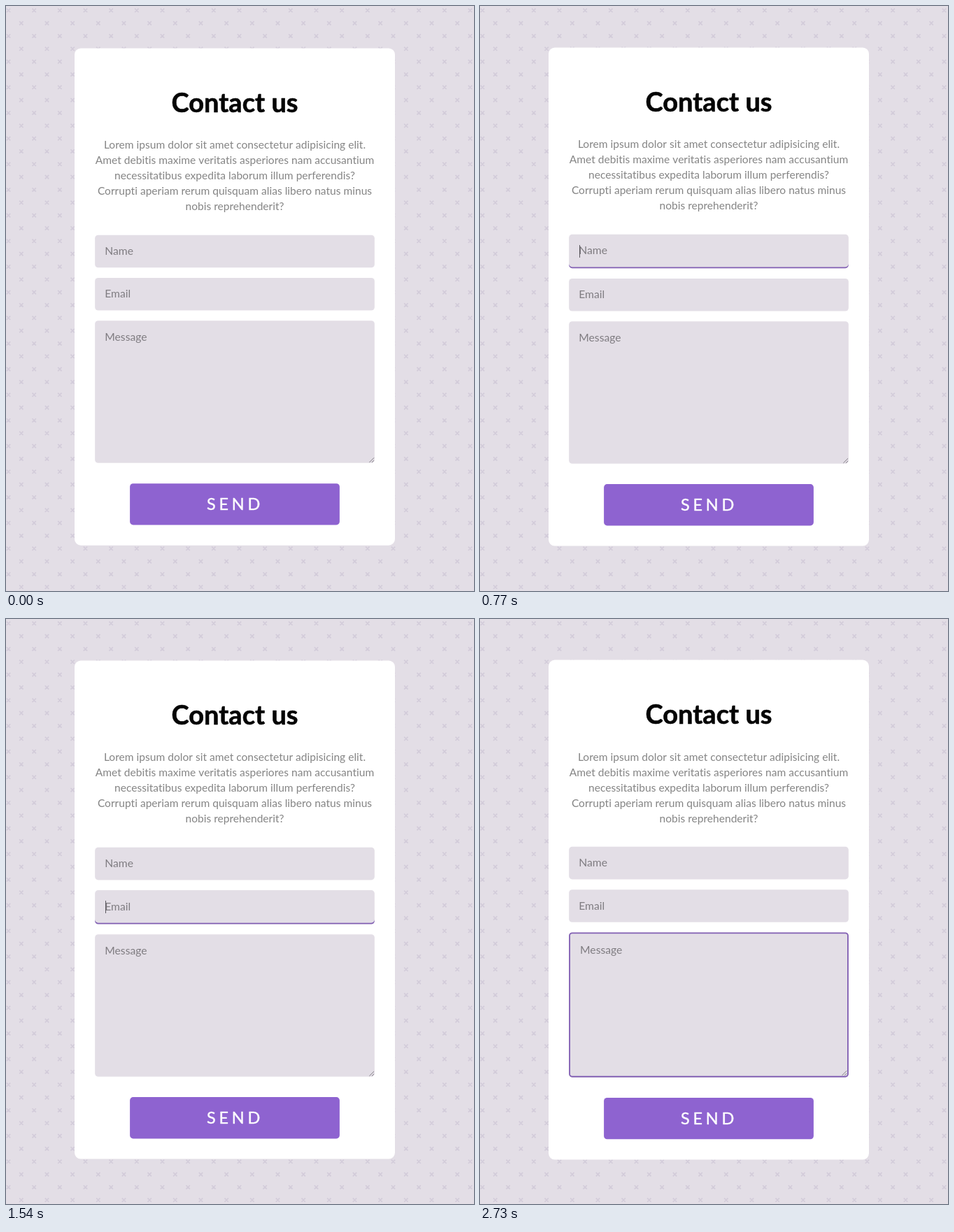
Recreate the animation shown at these times as an HTML page with a canvas. Size 669 by 837 pixels, loop 2800 ms.

```html
<!DOCTYPE html>
<html lang="en">
<head>
<meta charset="utf-8">
<title>Contact form</title>
<style>
html, body { margin: 0; width: 100%; height: 100%; overflow: hidden; background: #e3dee6; }
canvas { display: block; }
</style>
</head>
<body>
<canvas id="stage" width="669" height="837"></canvas>
<script>
const ctx = document.getElementById('stage').getContext('2d');
const W = 669, H = 837, LOOP = 2800;
const UNIT = 11 / 12;            // page zoom
const BORDER = 2 * UNIT, GAP = 16 * UNIT, PAD = 32 * UNIT;
const CENTER = 327, FIELD_W = 399.7, FIELD_X = CENTER - FIELD_W / 2, BUTTON_W = FIELD_W * 0.75;
const LAVENDER = '#e3dee6', PURPLE = '#8e63d0', FOCUS = '#8260b4', INK = '#050505';
const BODY_FONT = '15.56px Lato, sans-serif';
const LABEL_FONT = '15.7px Lato, sans-serif';
const NO_LIGATURES = 0.01;       // any letter spacing turns ligatures off

const INTRO = [
  'Lorem ipsum dolor sit amet consectetur adipisicing elit.',
  'Amet debitis maxime veritatis asperiores nam accusantium',
  'necessitatibus expedita laborum illum perferendis?',
  'Corrupti aperiam rerum quisquam alias libero natus minus',
  'nobis reprehenderit?'
];
const FIELDS = [
  { label: 'Name', height: 46.6 },
  { label: 'Email', height: 46.6 },
  { label: 'Message', height: 203.6, area: true }
];
// Which field has focus from a given moment, and when its caret blinks off
const STEPS = [
  { from: 0, focus: -1, caretOff: 0 },
  { from: 770, focus: 0, caretOff: 1260 },
  { from: 1540, focus: 1, caretOff: 2030 },
  { from: 2240, focus: 2, caretOff: 2730 }
];

function box(x, y, w, h, r, color) {
  ctx.fillStyle = color;
  ctx.beginPath();
  ctx.roundRect(x, y, w, h, r);
  ctx.fill();
}

function text(str, x, y, font, color, { align = 'left', spacing = NO_LIGATURES, stroke = 0 } = {}) {
  ctx.font = font;
  ctx.fillStyle = ctx.strokeStyle = color;
  ctx.textAlign = align;
  ctx.letterSpacing = spacing + 'px';
  ctx.fillText(str, x, y);
  if (!stroke) return;
  ctx.lineWidth = stroke;
  ctx.lineJoin = 'round';
  ctx.strokeText(str, x, y);
}

function line(x1, y1, x2, y2) {
  ctx.moveTo(x1, y1);
  ctx.lineTo(x2, y2);
}

function drawBackground() {
  const tile = 40 * UNIT, arm = 2.7;
  ctx.fillStyle = LAVENDER;
  ctx.fillRect(0, 0, W, H);
  ctx.strokeStyle = '#d3ccda';
  ctx.lineWidth = 1.7;
  ctx.beginPath();
  for (let row = 0; row < 47; row++) {
    const y = 6.3 + row * tile / 2;
    for (let x = 3.5 + (row % 2) * tile / 2; x < W + 4; x += tile) {
      line(x - arm, y - arm, x + arm, y + arm);
      line(x - arm, y + arm, x + arm, y - arm);
    }
  }
  ctx.stroke();
}

function drawGrip(right, bottom) {
  ctx.strokeStyle = '#77737a';
  ctx.lineWidth = 0.9;
  ctx.beginPath();
  line(right - 7.5, bottom - 0.8, right - 0.8, bottom - 7.5);
  line(right - 3.8, bottom - 0.8, right - 0.8, bottom - 3.8);
  ctx.stroke();
}

// The area is framed on all sides, the inputs only underlined
function drawFocus(y, height, inset) {
  ctx.fillStyle = FOCUS;
  ctx.beginPath();
  ctx.roundRect(FIELD_X, y, FIELD_W, height, 4.6);
  ctx.roundRect(FIELD_X + inset, y + inset, FIELD_W - 2 * inset, height - inset - BORDER,
                4.6 - inset);
  ctx.fill('evenodd');
}

function drawField(field, y, focused, caret) {
  const inset = focused && field.area ? BORDER : 0;
  const height = field.height + (focused ? BORDER + inset : 0);
  box(FIELD_X, y, FIELD_W, height, 4.6, LAVENDER);
  if (focused) drawFocus(y, height, inset);
  text(field.label, 141.2 + inset, y + inset + 28.5, LABEL_FONT, '#7f7c81');
  if (field.area) drawGrip(FIELD_X + FIELD_W - inset, y + height - inset);
  if (caret) {
    ctx.fillStyle = '#5a575d';
    ctx.fillRect(Math.round(142 + inset), Math.round(y + inset + 15), 1, 18);
  }
  return y + height;
}

function draw(time) {
  const step = STEPS.findLast(s => time >= s.from);
  // The centred card grows by the thickness of the focus border
  const growth = step.focus < 0 ? 0 : FIELDS[step.focus].area ? 2 * BORDER : BORDER;
  const top = 60.4 - growth / 2;

  drawBackground();
  box(98, top, 458, 711.3 + growth, 9, '#fff');

  text('Contact us', CENTER, top + 91.6, 'bold 38px Lato, sans-serif', INK,
       { align: 'center', stroke: 0.6 });
  INTRO.forEach((str, i) =>
    text(str, CENTER, top + 144 + 22 * i, BODY_FONT, '#858585', { align: 'center' }));

  let y = top + 267.3;
  FIELDS.forEach((field, i) => {
    const focused = i === step.focus;
    y = drawField(field, y, focused, focused && time < step.caretOff) + GAP;
  });

  y += PAD - GAP;
  box(CENTER - BUTTON_W / 2, y, BUTTON_W, 59.3, 4.6, PURPLE);
  text('SEND', 287, y + 37.9, '23.4px Lato, sans-serif', '#fff', { spacing: 4.8, stroke: 0.4 });
}

function tick() {
  draw(performance.now() % LOOP);
  requestAnimationFrame(tick);
}
tick();
</script>
</body>
</html>
```
